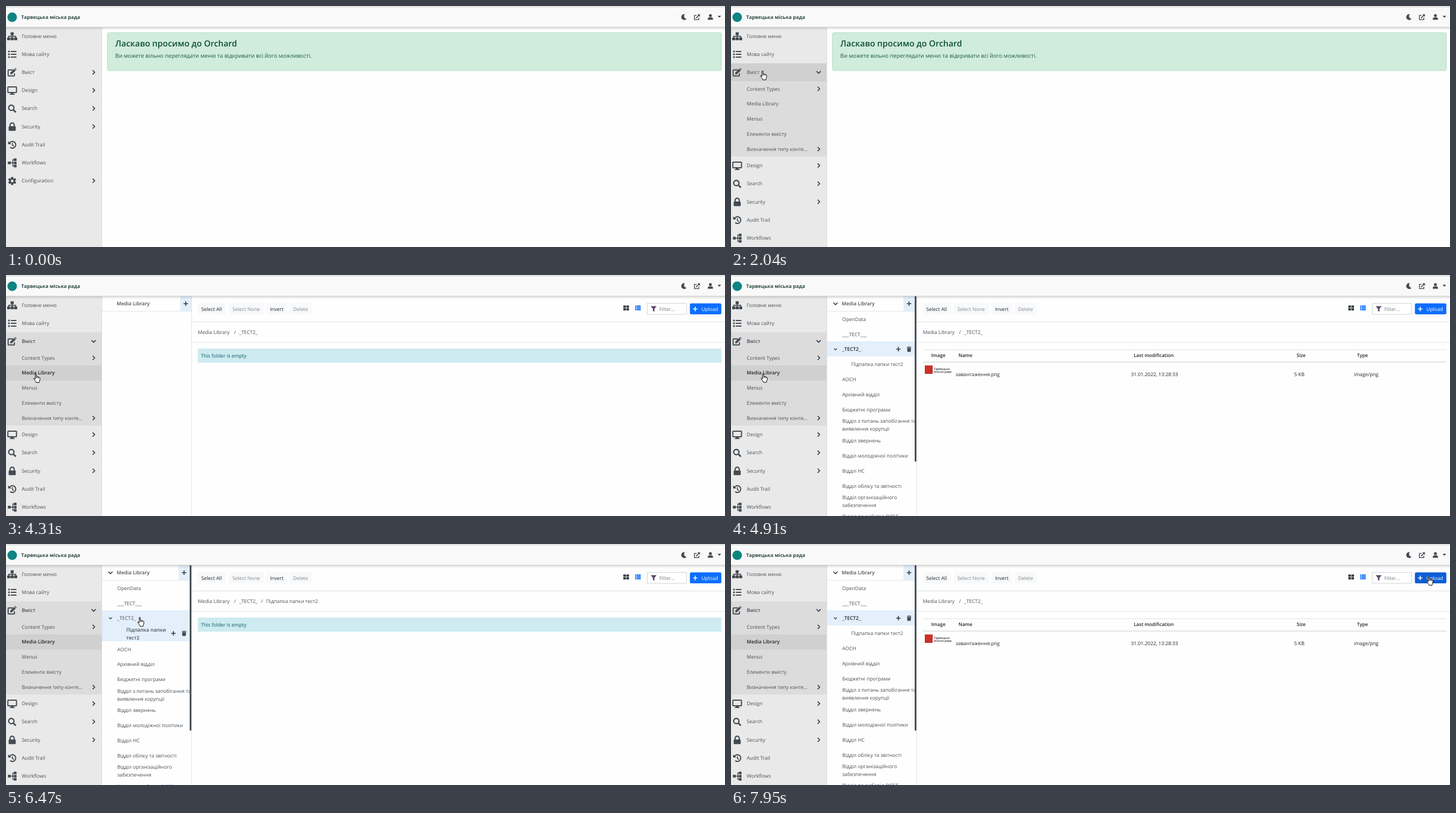
An HTML page with a canvas for the animation above (8000 ms loop, 1280 by 429 pixels).

```html
<!DOCTYPE html>
<html lang="uk">
<head>
<meta charset="utf-8">
<title>Media Library</title>
<style>
html, body { margin: 0; width: 100%; height: 100%; overflow: hidden; background: #fff; }
canvas { display: block; width: 1280px; height: 429px; }
</style>
</head>
<body>
<canvas id="stage"></canvas>
<script>
const W = 1280, H = 429, LOOP = 8000;
const canvas = document.getElementById('stage');
const g = canvas.getContext('2d');
const dpr = window.devicePixelRatio || 1;
canvas.width = W * dpr;
canvas.height = H * dpr;

const INK = '#495057', DARK = '#212529', ICON = '#444b52', LINE = '#dee2e6';
const BLUE = '#0d6efd', PICK = '#e3effb', HOVER = '#d0d0d0', SUB = '#dcdcdc', SIDE = '#e9e9e9';
const FONT = '"Open Sans", "Noto Sans", sans-serif';
const CITY = 'Тарвецька', COUNCIL = 'міська рада';
const SUBFOLDER = 'Підпапка папки тест2';

const clamp = v => Math.max(0, Math.min(1, v));
const ease = p => p * p * (3 - 2 * p);
// progress in n even steps, the first one shown at time a
const steps = (t, a, b, n) => clamp((Math.floor((t - a) / (b - a) * (n - 1) + 1e-6) + 1) / n);

function rect(x, y, w, h, fill) {
  g.fillStyle = fill;
  g.fillRect(x, y, w, h);
}
function round(x, y, w, h, r, fill, stroke) {
  g.beginPath();
  g.roundRect(x, y, w, h, r);
  if (fill) { g.fillStyle = fill; g.fill(); }
  if (stroke) { g.strokeStyle = stroke; g.lineWidth = 1; g.stroke(); }
}
function text(s, x, cy, color = INK, weight = 400, size = 8.85) {
  g.font = `${weight} ${size}px ${FONT}`;
  g.fillStyle = color;
  g.fillText(s, x, cy + size * 0.36);
}
function path(d, width, color) {
  const p = new Path2D(d);
  if (width) { g.strokeStyle = color || ICON; g.lineWidth = width; g.stroke(p); }
  else { g.fillStyle = color || ICON; g.fill(p); }
}
function at(x, y, draw) {
  g.save();
  g.translate(x, y);
  draw();
  g.restore();
}
function ring(x, y, r, width, a = 0, b = Math.PI * 2) {
  g.beginPath();
  g.arc(x, y, r, a, b);
  g.strokeStyle = ICON;
  g.lineWidth = width;
  g.stroke();
}

const icons = {
  sitemap() {
    path('M0-3V3M-6.3 3V0H6.3V3', 1.6);
    round(-2.8, -7.2, 5.6, 5.2, 1, ICON);
    for (const x of [-9, -2.8, 3.4]) round(x, 2, 5.6, 5.2, 1, ICON);
  },
  list() {
    for (const y of [-5, 0, 5]) {
      round(-7.2, y - 1.5, 3, 3, 1, ICON);
      round(-2.6, y - 1, 10.2, 2, 0.6, ICON);
    }
  },
  edit() {
    path('M1.5-4.6H-6.2Q-7.2-4.6-7.2-3.6V5.2Q-7.2 6.2-6.2 6.2H3Q4 6.2 4 5.2V1.5', 1.9);
    path('M-3.6 3.4L-3.2 0.2 3.6-6.4 6.4-3.6-0.4 3Z');
    path('M4.2-7L5.2-8 8-5.2 7-4.2Z');
  },
  desktop() {
    g.beginPath();
    g.roundRect(-7.7, -6.6, 15.4, 10, 1);
    g.strokeStyle = ICON;
    g.lineWidth = 2;
    g.stroke();
    path('M-2 4H2L2.6 6H4.5V7.6H-4.5V6H-2.6Z');
  },
  search() {
    ring(-1.5, -1.5, 4.7, 2.3);
    path('M2 2L6.5 6.5', 2.8);
  },
  lock() {
    round(-6.3, -1, 12.6, 8.4, 1.5, ICON);
    path('M-3.7 0V-3A3.7 3.7 0 0 1 3.7-3V0', 2.2);
  },
  history() {
    ring(0.4, 0, 6, 2, -2.7, 2.3);
    path('M-7.2-6.6V-1.2H-1.8Z');
    path('M0.4-3.4V0.6L3 2.4', 1.7);
  },
  flow() {
    path('M-4 0H5M5-5.7H1.2V5.7H5', 1.5);
    round(-7.6, -2.5, 5, 5, 0.8, ICON);
    for (const y of [-8, -2.4, 3.2]) round(3, y, 4.8, 4.8, 0.8, ICON);
  },
  gear() {
    ring(0, 0, 3.9, 3);
    for (let i = 0; i < 6; i++) {
      g.save();
      g.rotate(i * Math.PI / 3);
      round(-1.9, -7.3, 3.8, 3.2, 0.7, ICON);
      g.restore();
    }
  },
  moon() { path('M1.6-5A5.2 5.2 0 1 0 4.6 3.1A4.7 4.7 0 0 1 1.6-5Z'); },
  open() {
    path('M-0.5-3.2H-4.4V4.6H3.4V1', 1.4);
    path('M-1.6 1.8L4 -3.8', 1.6);
    path('M0.8-5H5.4V-0.4Z');
  },
  user() {
    g.beginPath();
    g.arc(0, -2.6, 2.6, 0, 7);
    g.fillStyle = ICON;
    g.fill();
    path('M-4.6 5V3.4Q-4.6 0.7-2 0.7H2Q4.6 0.7 4.6 3.4V5Z');
  },
  right() { path('M-1.8-3.7L1.9 0-1.8 3.7', 1.6, '#343a40'); },
  down() { path('M-3.7-1.8L0 1.9 3.7-1.8', 1.6, '#343a40'); },
  smallDown() { path('M-2.6-1.2L0 1.3 2.6-1.2', 1.2, '#343a40'); },
  plus() { path('M-4 0H4M0-4V4', 1.6, '#343a40'); },
  trash() {
    path('M-4-4H-1.5L-1-4.8H1L1.5-4H4V-2.9H-4Z');
    path('M-3.5-2.2H3.5L3 4.8H-3Z');
  },
  grid() {
    for (const x of [-5, 0.5]) for (const y of [-4.3, 0.5]) rect(x, y, 4.6, 4, '#343a40');
  },
  rows() {
    for (const y of [-4.3, -1.2, 1.9]) {
      rect(-5, y, 2.4, 2.3, BLUE);
      rect(-2, y, 7, 2.3, BLUE);
    }
  },
  funnel() { path('M-5.2-5H5.2L1.4-0.3V5L-1.4 3.2V-0.3Z', 0, '#5b4568'); }
};
const icon = (name, x, y) => at(x, y, icons[name]);

// start, end, steps, then four points of a cubic curve for the pointer tip
const moves = [
  [620, 1270, 14, 961, 337, 600, -20, 200, 30, 56, 115],
  [2230, 2840, 12, 56, 115, 58, 130, 47, 150, 49, 167],
  [2990, 3110, 2, 49, 167, 50, 170, 52, 173, 53, 175],
  [4910, 5430, 11, 53, 175, 110, 170, 200, 145, 259, 146],
  [5580, 5680, 3, 259, 146, 258, 150, 256, 154, 255, 157],
  [5930, 6470, 11, 255, 157, 252, 148, 242, 140, 238, 130],
  [7180, 7950, 15, 238, 130, 500, 200, 1290, 225, 1242, 57]
];
function pointer(t) {
  const m = moves.filter(v => t >= v[0]).pop();
  if (!m) return null;
  const p = ease(steps(t, m[0], m[1], m[2])), q = 1 - p;
  const axis = i => q * q * q * m[i] + 3 * q * q * p * m[i + 2] + 3 * q * p * p * m[i + 4] + p * p * p * m[i + 6];
  return { x: axis(3), y: axis(4) };
}
const inside = (c, x, y, w, h) => !!c && c.x >= x && c.x < x + w && c.y >= y && c.y < y + h;

function drawPointer(c, media) {
  const hand = inside(c, 0, 38, 170, 391) || (media && inside(c, 171, 38, 156, 391)) || inside(c, 1217, 51, 56, 19);
  at(c.x, c.y, () => {
    g.lineJoin = 'round';
    const d = hand
      ? 'M-0.8 1Q0.2-0.4 1.2 1V6L3.2 6.1 5 6.7 6.7 7.4Q7.8 8 7.6 10L7 13Q6.2 14.4 6.1 16.4H0.8Q0.5 15-0.7 13.5L-3.2 10Q-3.8 8.6-2.4 8.6L-0.8 10.2Z'
      : 'M0.5 0.5V15L4 12 6.3 17.4 8.5 16.4 6.2 11.3H10.8Z';
    path(d, 0, '#fff');
    path(d, 1, '#000');
    if (hand) path('M1.2 6V9M3.2 6.4V9M5.2 7V9.4', 0.7, '#000');
  });
}

const menu = [
  ['Головне меню', 'sitemap'], ['Мова сайту', 'list'], ['Вміст', 'edit', 1], ['Design', 'desktop', 1],
  ['Search', 'search', 1], ['Security', 'lock', 1], ['Audit Trail', 'history'], ['Workflows', 'flow'],
  ['Configuration', 'gear', 1]
];
const submenu = ['Content Types', 'Media Library', 'Menus', 'Елементи вмісту', 'Визначення типу конте...'];

function drawSide(t, c, loaded) {
  const row = 32.2, sub = 26.8;
  const open = t < 1590 ? 0 : ease(steps(t, 1590, 2040, 9)) * 134;
  const active = t >= 3970;
  rect(0, 38, 170, 391, SIDE);
  rect(170, 38, 1, 391, '#dadada');
  menu.forEach(([label, name, more], i) => {
    const top = 37.5 + i * row + (i > 2 ? open : 0), cy = top + 16;
    const current = i === 2 && active;
    if (inside(c, 0, top, 170, row)) rect(0, Math.round(top), 170, 32, HOVER);
    else if (current) rect(0, 102, 170, 32, SUB);
    text(label, 28, cy, INK, current ? 600 : 400);
    if (!loaded) return;
    icon(name, 11, cy + 0.4);
    if (more) icon(i === 2 && t >= 1590 ? 'down' : 'right', 156, cy);
  });
  if (!open) return;
  g.save();
  g.beginPath();
  g.rect(0, 134, 170, open);
  g.clip();
  rect(0, 134, 170, 134, SUB);
  submenu.forEach((label, i) => {
    const top = 134 + i * sub, cy = top + 13.5;
    const current = i === 1 && active;
    if (current || inside(c, 0, top, 170, sub)) rect(0, Math.round(top), 170, 27, HOVER);
    text(label, 28, cy, current ? DARK : INK, current ? 600 : 400);
    if (loaded && (i === 0 || i === 4)) icon('right', 156, cy);
  });
  g.restore();
}

function drawHeader(loaded) {
  rect(0, 0, W, 38, '#f9f9f9');
  rect(0, 0, W, 1, '#fff');
  rect(0, 1, W, 1, '#c6c6c6');
  const shade = g.createLinearGradient(0, 37, 0, 43);
  shade.addColorStop(0, 'rgba(0,0,0,.16)');
  shade.addColorStop(1, 'rgba(0,0,0,0)');
  rect(0, 37, W, 6, shade);
  g.beginPath();
  g.arc(11, 20, 8.5, 0, 7);
  g.fillStyle = '#0f8482';
  g.fill();
  text(CITY + ' ' + COUNCIL, 27, 19.8, '#2f4a45', 700, 8.7);
  if (loaded) {
    icon('moon', 1207, 19.6);
    icon('open', 1230, 19.8);
    icon('user', 1254, 19.6);
  }
  path('M1266.8 17.6H1273.2L1270 20.8Z', 0, '#343a40');
}

function drawWelcome() {
  round(180.5, 47.5, 1093, 67.5, 2.5, '#d0ecdb', '#b9dcca');
  text('Ласкаво просимо до Orchard', 194.5, 66.3, '#0f5132', 600, 14.9);
  text('Ви можете вільно переглядати меню та відкривати всі його можливості.', 194.5, 88.3, '#1d5a3d', 400, 9.95);
}

function drawTree(t, c, deep) {
  const tree = t >= 4520, kids = t >= 4670;
  const right = tree ? 327 : 330;
  const title = 'Media Library';
  rect(171, 64, right - 171, 1, '#e3e6e9');
  rect(right - 20, 38, 20, 26, PICK);
  icon('plus', right - 10, 51);
  text(title, 197, 51, INK, 600);
  rect(330, 38, 1, 391, LINE);
  if (!tree) return;

  icon('down', 186, 51);
  text('OpenData', 198, 79);
  text('___ТЕСТ___', 198, 105.5);
  if (inside(c, 171, 65, 156, 27)) rect(171, 65, 156, 27, 'rgba(13,110,253,.08)');
  const subTop = 145, subH = deep ? 28 : 27;
  rect(171, 118, 156, 27, PICK);
  if (kids && (deep || inside(c, 171, subTop, 156, subH))) rect(171, subTop, 156, subH, PICK);
  if (kids) icon('smallDown', 186, 132);
  text('_ТЕСТ2_', 198, 132, deep ? INK : DARK, deep ? 400 : 600);
  const tools = deep ? 159 : 132;
  icon('plus', 298, tools);
  icon('trash', 317, tools);
  if (deep) {
    text('Підпапка папки', 214, 152.5, INK, 600);
    text('тест2', 214, 166.5, INK, 600);
  } else if (kids) text(SUBFOLDER, 214, 159);

  const folders = ['АОСН', 'Архівний відділ', 'Бюджетні програми',
    'Відділ з питань запобігання та|виявлення корупції', 'Відділ звернень', 'Відділ молодіжної політики',
    'Відділ НС', 'Відділ обліку та звітності', 'Відділ організаційного|забезпечення', 'Відділ по роботі з ОСББ'];
  let top = (kids ? 172.5 : 145.5) + (deep ? 1.4 : 0);
  for (const name of folders) {
    const lines = name.split('|'), h = lines.length > 1 ? 28 : 26.9;
    lines.forEach((s, i) => text(s, 198, top + (lines.length > 1 ? 7 + 14 * i : 13.5)));
    top += h;
  }
  rect(327, 38, 3, 294, INK);
}

function drawFiles(t, c, deep) {
  const buttons = [['Select All', 341.5, 49.5, 1], ['Select None', 397, 62], ['Invert', 464, 36, 1], ['Delete', 505, 39]];
  for (const [label, x, w, on] of buttons) {
    round(x, 50, w, 20, 2, '#f8f9fa');
    text(label, x + 6, 60.6, on ? DARK : '#83898e');
  }
  icon('grid', 1104, 58.6);
  icon('rows', 1125, 58.6);
  round(1141.5, 50.5, 70, 19.5, 0, '#fff', '#ced4da');
  icon('funnel', 1153, 60.5);
  text('Filter...', 1163, 60.6, '#747d85');
  round(1217.5, 50.5, 56, 19.5, 2.5, inside(c, 1217, 50, 56, 20) ? '#0b5ed7' : BLUE);
  path('M1223 60.5H1231M1227 56.5V64.5', 1.6, '#fff');
  text('Upload', 1238, 60.6, '#fff');
  rect(331, 83, 949, 1, LINE);

  text('Media Library', 341.5, 102.3);
  text('/', 406, 102.3);
  text('_ТЕСТ2_', 415, 102.3);
  if (deep) {
    text('/', 454, 102.3);
    text(SUBFOLDER, 463, 102.3);
  }
  rect(331, 119.5, 949, 1, LINE);

  if (t < 4520 || (t >= 5930 && t < 6840)) {
    rect(341.5, 131, 932, 25, '#cdebf0');
    text('This folder is empty', 347, 144, '#0b5968');
    return;
  }
  rect(341.5, 132.5, 932, 1, LINE);
  rect(341.5, 154.5, 932, 1, '#c9ced3');
  const heads = [['Image', 356.5], ['Name', 405], ['Last modification', 717], ['Size', 1007], ['Type', 1114.5]];
  for (const [label, x] of heads) text(label, x, 143.3, DARK, 600, 8.5);
  if (t < 4670) return;
  rect(345, 161, 14, 15, '#c8322b');
  text(CITY, 361, 167, '#333', 600, 5.3);
  text(COUNCIL, 361, 172.3, '#333', 600, 5.3);
  const cells = [['завантаження.png', 400], ['31.01.2022, 13:28:33', 712], ['5 KB', 1002.5], ['image/png', 1109]];
  for (const [label, x] of cells) text(label, x, 177, DARK, 400, 8.75);
}

function draw(t) {
  g.setTransform(dpr, 0, 0, dpr, 0, 0);
  g.textRendering = 'geometricPrecision';
  const c = pointer(t);
  const media = t >= 4310, loaded = t < 3970 || t >= 4110;
  const deep = t >= 5930 && t < 6740;
  rect(0, 0, W, H, '#fefefe');
  drawSide(t, c, loaded);
  if (t < 3970) drawWelcome();
  if (media) {
    drawTree(t, c, deep);
    drawFiles(t, c, deep);
  }
  drawHeader(loaded);
  if (c) drawPointer(c, media);
}

const start = performance.now();
function tick() {
  draw((performance.now() - start) % LOOP);
  requestAnimationFrame(tick);
}
tick();
</script>
</body>
</html>
```
